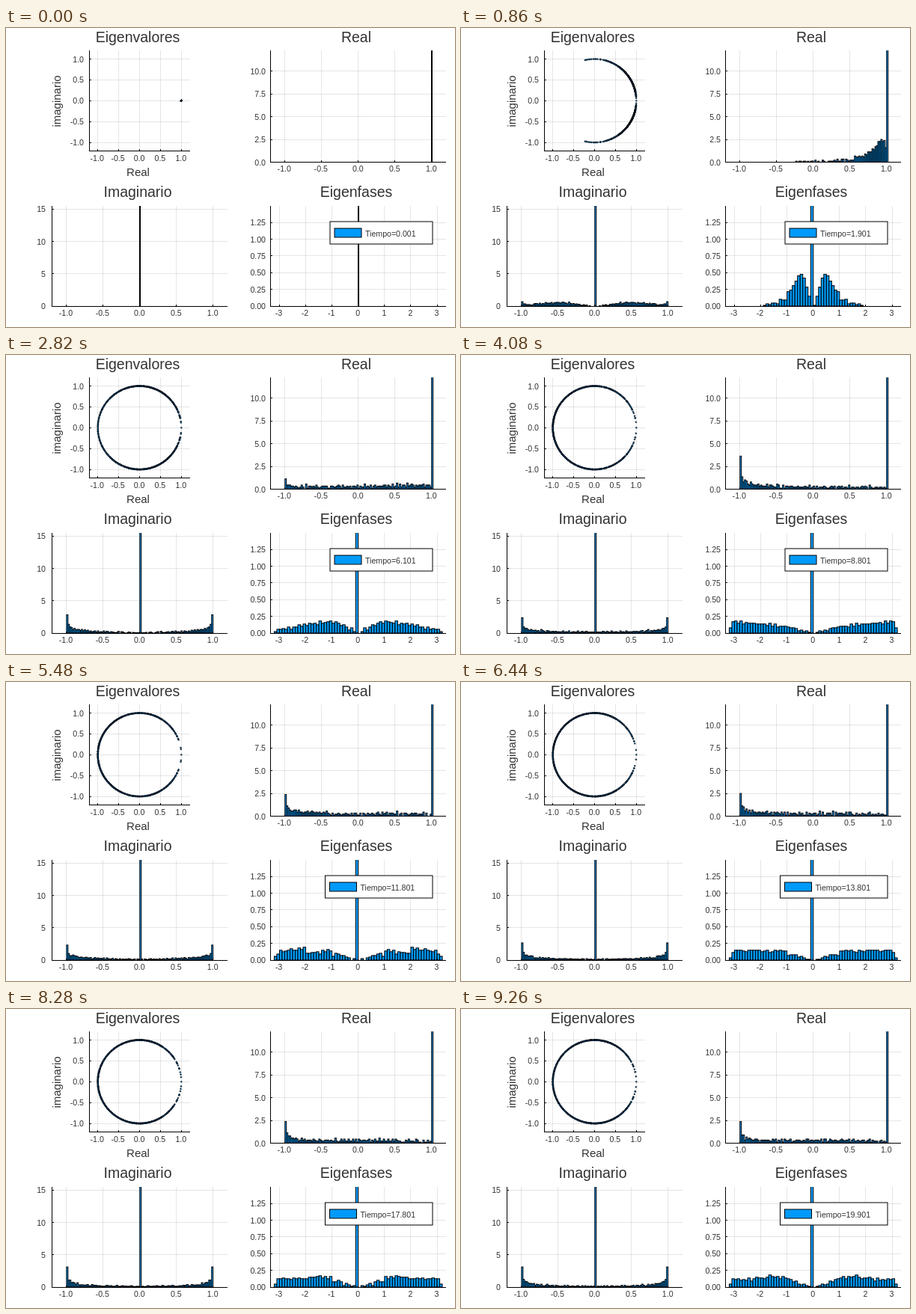
Write an HTML page with a canvas that moves like this. It is 600 px wide and 400 px high and loops after 9.28 s.

```html
<!DOCTYPE html>
<html lang="es">
<head>
<meta charset="utf-8">
<title>Eigenvalores</title>
<style>
  html, body { margin: 0; width: 100%; height: 100%; overflow: hidden; background: #fff; }
  canvas, svg { position: absolute; left: 0; top: 0; width: 600px; height: 400px; }
  text { font-family: "Liberation Sans", Arial, sans-serif; font-size: 10.6px; fill: #333; }
  .title { font-size: 19.5px; }
  .guide { font-size: 15px; }
</style>
</head>
<body>
<canvas id="plot" width="600" height="400"></canvas>
<svg id="over" viewBox="0 0 600 400"></svg>
<script>
const LOOP = 9280, FRAMES = 200, PAIRS = 300, BULK = 0.68;
const BLUE = '#009AFA';
const ctx = document.getElementById('plot').getContext('2d');
const over = document.getElementById('over');

// Plot areas: pixel box, origin (x0, y0), pixels per unit (sx, sy), ticks
const unit = [-1, -0.5, 0, 0.5, 1];
const panels = {
  scatter: { title: 'Eigenvalores', cx: 176, ty: 19, l: 111, r: 246, t: 30, b: 164, x0: 178.5, y0: 97.3, sx: 55.8, sy: 55.8,
    xt: unit, yt: unit, xd: 1, yd: 1, lx: 104 },
  real: { title: 'Real', cx: 468, ty: 19, l: 353, r: 588, t: 30, b: 179, x0: 470.75, y0: 179.5, sx: 98, sy: 12.2,
    xt: unit, yt: [0, 2.5, 5, 7.5, 10], xd: 1, yd: 1, lx: 347 },
  imag: { title: 'Imaginario', cx: 176, ty: 226, l: 61, r: 296, t: 238, b: 372, x0: 178.8, y0: 372, sx: 97.9, sy: 8.65,
    xt: unit, yt: [0, 5, 10, 15], xd: 1, yd: 0, lx: 53 },
  phase: { title: 'Eigenfases', cx: 468, ty: 226, l: 353, r: 588, t: 238, b: 372, x0: 470.75, y0: 372, sx: 35.1, sy: 89.4,
    xt: [-3, -2, -1, 0, 1, 2, 3], yt: [0, 0.25, 0.5, 0.75, 1, 1.25], xd: 0, yd: 2, lx: 347 }
};

function add(tag, attrs, text) {
  const el = document.createElementNS('http://www.w3.org/2000/svg', tag);
  for (const k in attrs) el.setAttribute(k, attrs[k]);
  if (text) el.textContent = text;
  over.appendChild(el);
  return el;
}

function label(x, y, text, anchor, cls) {
  return add('text', { x, y, 'text-anchor': anchor, class: cls || '' }, text);
}

for (const p of Object.values(panels)) {
  label(p.cx, p.ty, p.title, 'middle', 'title');
  for (const v of p.xt) {
    const x = p.x0 + v * p.sx - (v < 0 ? 1 : 0.5);
    label(x, p.b + (p === panels.scatter ? 14 : 13), v.toFixed(p.xd), 'middle');
  }
  for (const v of p.yt) label(p.lx, p.y0 - v * p.sy + 4, v.toFixed(p.yd), 'end');
}
label(176.5, 197.5, 'Real', 'middle', 'guide');
label(0, 0, 'imaginario', 'middle', 'guide').setAttribute('transform', 'translate(72.5 98) rotate(-90)');

const box = add('rect', { y: 259, height: 30, fill: '#fff', stroke: '#000' });
const swatch = add('rect', { y: 268, width: 36, height: 12, fill: BLUE, stroke: '#000' });
const clock = label(480, 279, '', 'start');

// Quantiles of the positive phases at a few times
const probs = [0, 0.012, 0.05, 0.15, 0.3, 0.5, 0.7, 0.85, 0.95, 1];
const spread = [
  [0, [0, 0, 0, 0, 0, 0, 0, 0, 0, 0]],
  [1.9, [0.05, 0.11, 0.21, 0.32, 0.435, 0.575, 0.76, 0.97, 1.32, 1.8]],
  [6.1, [0.1, 0.24, 0.43, 0.73, 1.04, 1.45, 1.93, 2.37, 2.85, 3.13]],
  [8.8, [0.13, 0.34, 0.65, 1.05, 1.53, 2.06, 2.52, 2.85, 3.04, 3.14]],
  [11.8, [0.13, 0.38, 0.63, 1.01, 1.38, 1.99, 2.39, 2.73, 2.99, 3.14]],
  [15.8, [0.1, 0.3, 0.64, 1.06, 1.41, 1.85, 2.38, 2.77, 2.99, 3.14]],
  [19.91, [0.12, 0.33, 0.62, 0.965, 1.32, 1.75, 2.25, 2.7, 3, 3.14]]
];

let seed = 7;
function rand() {
  seed = (seed * 1664525 + 1013904223) % 4294967296;
  return seed / 4294967296;
}
const levels = Array.from({ length: PAIRS }, (_, k) => ({
  u: (k + 0.5) / PAIRS, amp: (0.6 + 1.4 * rand()) / PAIRS, speed: 1 + 2 * rand(), turn: 6.283 * rand()
}));

function phasesAt(time) {
  let s = 1;
  while (s < spread.length - 1 && time > spread[s][0]) s++;
  const [ta, qa] = spread[s - 1], [tb, qb] = spread[s];
  const f = (time - ta) / (tb - ta);
  const q = qa.map((v, i) => v + (qb[i] - v) * f);
  return levels.map(n => {
    const u = Math.min(1, Math.max(0, n.u + n.amp * Math.sin(n.speed * time + n.turn)));
    let i = 1;
    while (i < probs.length - 1 && u > probs[i]) i++;
    return q[i - 1] + (q[i] - q[i - 1]) * (u - probs[i - 1]) / (probs[i] - probs[i - 1]);
  });
}

// Round bin width: 1, 2, 5 or 10 times a power of ten
function binWidth(range, n) {
  const raw = range / n, power = 10 ** Math.floor(Math.log10(raw)), r = raw / power;
  return power * (r <= 1.1 ? 1 : r <= 2.2 ? 2 : r <= 5.5 ? 5 : 10);
}

function histogram(p, values, still, n) {
  const lo = Math.min(still, ...values), hi = Math.max(still, ...values);
  const w = binWidth(hi - lo, n);
  const first = Math.floor(lo / w + 1e-6);
  const bin = v => Math.floor(v / w + 1e-6) - first;
  const bars = new Array(Math.max(bin(hi), bin(still)) + 1).fill(0);
  for (const v of values) bars[bin(v)] += BULK / values.length / w;
  bars[bin(still)] += Math.max(1 - BULK, 16 * w) / w;

  ctx.save();
  ctx.beginPath();
  ctx.rect(p.l, p.t, p.r - p.l, p.b - p.t + 1);
  ctx.clip();
  ctx.fillStyle = BLUE;
  ctx.strokeStyle = '#000';
  bars.forEach((h, i) => {
    if (!h) return;
    const rect = [p.x0 + (first + i) * w * p.sx, p.y0, w * p.sx, -Math.min(h * p.sy, 400)];
    ctx.fillRect(...rect);
    ctx.strokeRect(...rect);
  });
  ctx.restore();
}

function line(x1, y1, x2, y2) {
  ctx.beginPath();
  ctx.moveTo(x1, y1);
  ctx.lineTo(x2, y2);
  ctx.stroke();
}
const crisp = v => Math.floor(v) + 0.5;

function grid(p) {
  ctx.strokeStyle = 'rgba(0,0,0,0.1)';
  for (const v of p.xt) { const x = crisp(p.x0 + v * p.sx); line(x, p.t, x, p.b); }
  for (const v of p.yt) { const y = crisp(p.y0 - v * p.sy); line(p.l, y, p.r, y); }
}

function axes(p) {
  ctx.strokeStyle = '#000';
  line(p.l + 0.5, p.t, p.l + 0.5, p.b + 1);
  line(p.l, p.b + 0.5, p.r, p.b + 0.5);
  for (const v of p.xt) { const x = crisp(p.x0 + v * p.sx); line(x, p.b - 2, x, p.b); }
  for (const v of p.yt) { const y = crisp(p.y0 - v * p.sy); line(p.l, y, p.l + 3, y); }
}

function dot(angle) {
  const p = panels.scatter;
  ctx.beginPath();
  ctx.arc(p.x0 + p.sx * Math.cos(angle), p.y0 - p.sy * Math.sin(angle), 0.85, 0, 7);
  ctx.fill();
  ctx.stroke();
}

function draw(i) {
  const time = 0.001 + i / 10;
  const half = phasesAt(time);
  const all = half.concat(half.map(a => -a));
  ctx.clearRect(0, 0, 600, 400);
  ctx.lineWidth = 1;
  Object.values(panels).forEach(grid);
  histogram(panels.real, all.map(Math.cos), 1, 100);
  histogram(panels.imag, all.map(Math.sin), 0, 100);
  histogram(panels.phase, all, -binWidth(2 * Math.max(...half), 60) / 2, 60);
  Object.values(panels).forEach(axes);

  ctx.fillStyle = BLUE;
  ctx.lineWidth = 0.8;
  all.forEach(dot);
  dot(0);

  const left = time < 10 ? 433 : 426.5;
  box.setAttribute('x', left);
  box.setAttribute('width', 570 - left);
  swatch.setAttribute('x', left + 6);
  clock.setAttribute('x', left + 47);
  clock.textContent = 'Tiempo=' + time.toFixed(3);
}

// Steps last 20, 100, 20 ms in turn
const startOf = i => 20 * i + 80 * Math.floor((i + 1) / 3);

const begin = performance.now();
let shown = -1;
function tick() {
  const t = (performance.now() - begin) % LOOP;
  let i = FRAMES - 1;
  while (i > 0 && startOf(i) > t) i--;
  if (i !== shown) draw(shown = i);
  requestAnimationFrame(tick);
}
tick();
</script>
</body>
</html>
```
